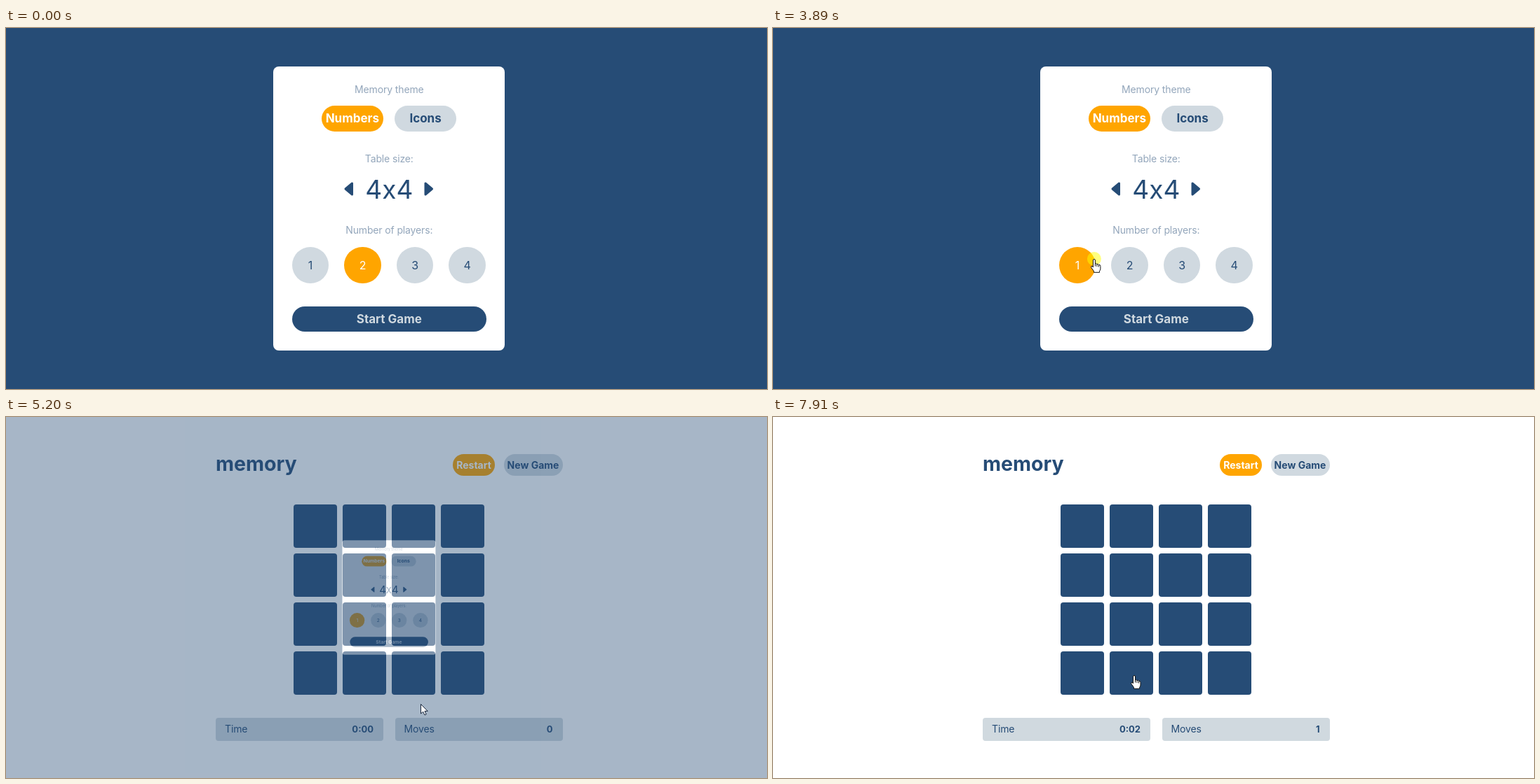
An HTML page for the animation above (8 s loop, 1085 px wide and 516 px high).

```html
<!DOCTYPE html>
<html lang="en">
<head>
<meta charset="utf-8">
<title>Memory game</title>
<style>
  html, body { margin: 0; width: 100%; height: 100%; overflow: hidden; background: #fff; }
  #stage { position: absolute; inset: 0; width: 1085px; height: 516px; overflow: hidden;
    font-family: Inter, "Open Sans", sans-serif; color: #264c76; cursor: default; }
  #stage div { position: absolute; display: flex; align-items: center; justify-content: center;
    white-space: nowrap; line-height: 1; }
  #stage svg { position: absolute; left: 0; top: 0; overflow: visible; }
  #stage .fill { inset: 0; }
  #stage .left { justify-content: flex-start; }
  #stage .right { justify-content: flex-end; }
  .pill, .round { border-radius: 30px; background: #d0d9e0; }
  .pill { font-weight: 700; font-size: 17px; }
  .small { font-size: 14px; }
  .round { font-size: 16px; }
  #stage .on { background: #ffa500; color: #fff; }
  #stage .start { background: #264c76; color: #d0d9e0; }
  .title { font-size: 28.5px; font-weight: 700; }
  .size { font-size: 37px; }
  .label { font-size: 14px; letter-spacing: -.01em; color: #93a6bb; }
  .dialog { border-radius: 8px; background: #fff; }
  .panel { border-radius: 4px; background: #d0d9df; }
  .stat { font-size: 14px; letter-spacing: -.01em; }
  .value { font-size: 13px; font-weight: 700; }
  .card { border-radius: 4px; color: #fff; font-weight: 700; font-size: 26px; }
  .halo { border-radius: 50%; background: rgba(255, 255, 0, .5); }
  #stage .pointer, .pointer * { pointer-events: none; }
</style>
</head>
<body>
<div id="stage"></div>
<script>
const LOOP = 8000;
const stage = document.getElementById('stage');

// Moments of the pointer's clicks; every state change follows from them.
const click = { bigger: 1580, smaller: 1920, onePlayer: 3760, start: 5000, first: 6060, second: 6680 };

// Stops of the pointer: time, x, y.
const stops = [
  [350, 1033, 474], [1140, 610, 256], [1360, 599, 227], [2150, 599, 227], [2800, 533.5, 344],
  [3310, 514, 347], [3610, 450, 338], [3830, 450, 338], [4200, 545, 228], [4560, 638, 212],
  [4900, 591, 410], [5200, 591, 410], [5340, 501, 414], [5910, 443, 371], [6340, 443, 371],
  [6600, 442, 295], [7150, 442, 295], [7700, 514, 369]
];

const ramp = (t, from, length) => Math.min(1, Math.max(0, (t - from) / length));
const smooth = p => p * p * (3 - 2 * p);
const ease = (t, from, length) => smooth(ramp(t, from, length));
const between = (t, from, to) => t >= from && t < to;

function box(parent, cls, x, y, w, h, text = '') {
  const el = document.createElement('div');
  el.className = cls;
  el.textContent = text;
  Object.assign(el.style, { left: x + 'px', top: y + 'px', width: w + 'px', height: h + 'px' });
  parent.append(el);
  return el;
}

function group(cls) {
  const el = document.createElement('div');
  el.className = cls;
  stage.append(el);
  return el;
}

function shape(parent, d, attrs) {
  parent.insertAdjacentHTML('beforeend',
    `<svg width="1" height="1"><path d="${d}" stroke-linejoin="round" ${attrs}/></svg>`);
  return parent.lastElementChild;
}

// Game board
const game = group('fill');
box(game, 'title left', 299, 52, 140, 31, 'memory');
box(game, 'pill small on hot', 637, 53, 60, 31, 'Restart');
box(game, 'pill small hot', 709.5, 53, 84, 31, 'New Game');
const cards = Array.from({ length: 16 }, (_, i) => {
  const slot = box(game, 'hot', 410.2 + i % 4 * 70, 125.2 + Math.floor(i / 4) * 70, 61.8, 61.8);
  return box(slot, 'card', 0, 0, 61.8, 61.8);
});

function stat(x, name) {
  box(game, 'panel', x, 430, 239, 33);
  box(game, 'stat left', x + 13, 430, 100, 32, name);
  return box(game, 'value right', x + 125, 430, 100, 32);
}
const time = stat(299, 'Time');
const moves = stat(554.5, 'Moves');

// Settings dialog
const menu = group('fill');
menu.style.background = '#264c76';
const dialog = box(menu, 'dialog', 381.3, 55.2, 329.8, 405.8);
box(dialog, 'label', 0, 23, 330, 20, 'Memory theme');
box(dialog, 'pill on hot', 68.5, 56, 88, 37, 'Numbers');
box(dialog, 'pill hot', 173, 56, 87.5, 37, 'Icons');
box(dialog, 'label', 0, 122, 330, 20, 'Table size:');
const size = box(dialog, 'size', 100, 150, 130, 50);
const triangle = 'class="hot" fill="#264c76" stroke="#264c76" stroke-width="3"';
const leftArrow = shape(dialog, 'M103 175L112.5 167V183Z', triangle);
const rightArrow = shape(dialog, 'M226.5 175L217 167V183Z', triangle);
box(dialog, 'label', 0, 224, 330, 20, 'Number of players:');
const players = [1, 2, 3, 4].map((n, i) =>
  box(dialog, 'round hot', 26.4 + i * 74.5, 257.5, 52.8, 52.8, n));
const start = box(dialog, 'pill start hot', 26.5, 343, 277, 36.3, 'Start Game');

// Pointer
const pointer = group('pointer');
const halo = box(pointer, 'halo', -9, -10, 20, 20);
const arrow = shape(pointer, 'M.5 .5V14L3.7 11.2L6 16L8.2 15L6 10.4H10.2Z',
  'fill="#fff" stroke="#16243a"');
const hand = shape(pointer,
  'M-1.5 12V2Q-1.5 .5 0 .5T1.5 2V7Q3 6 4 7.6Q5.6 6.8 6.5 8.4Q9 8 9 10.5V14Q9 16 7.6 17.5V19.3H-.5V17.5L-4.2 12.3Q-4.6 10 -2.8 10.2Z' +
  'M1.5 7V10.5M4 7.6V11M6.5 8.4V11.5',
  'fill="#fff" stroke="#111" transform="translate(1)"');

function tipAt(t) {
  const i = stops.findIndex(s => s[0] > t);
  if (i < 1) return stops.at(i).slice(1);
  const [t0, x0, y0] = stops[i - 1], [t1, x1, y1] = stops[i];
  const p = ease(t, t0, t1 - t0);
  return [x0 + (x1 - x0) * p, y0 + (y1 - y0) * p];
}

function turn(card, number, amount) {
  const open = amount > .5;
  const angle = amount * 180 - (open ? 180 : 0);
  card.textContent = open ? number : '';
  card.style.background = open ? '#d0d9df' : '#264c76';
  card.style.transform = angle ? `perspective(400px) rotateY(${angle}deg)` : 'none';
}

const show = (el, visible) => { el.style.visibility = visible ? 'visible' : 'hidden'; };

function render(t) {
  const large = between(t, click.bigger + 70, click.smaller + 70);
  size.textContent = large ? '6x6' : '4x4';
  leftArrow.style.left = large ? '2px' : '0';
  rightArrow.style.left = large ? '-2px' : '0';
  const chosen = t < click.onePlayer + 70 ? 1 : 0;
  players.forEach((el, i) => el.classList.toggle('on', i === chosen));

  const presence = 1 - ramp(t, click.start + 78, 206);
  menu.style.opacity = presence;
  dialog.style.transform = `scale(${presence})`;
  show(menu, presence > 0);

  const close = ease(t, click.second + 700, 320);
  cards.forEach(card => turn(card, '', 0));
  turn(cards[12], 8, ease(t, click.first + 30, 300) - close);
  turn(cards[8], 3, ease(t, click.second + 30, 300) - close);
  const seconds = Math.max(0, Math.floor((t - click.start - 130) / 1000));
  time.textContent = '0:0' + seconds;
  moves.textContent = t < click.second + 320 ? 0 : 1;

  const [x, y] = tipAt(t);
  const hovered = document.elementFromPoint(x, y)?.closest('.hot');
  const visible = t >= stops[0][0];
  start.style.opacity = hovered === start ? .75 : 1;
  pointer.style.transform = `translate(${x}px, ${y}px)`;
  show(arrow, visible && !hovered);
  show(hand, visible && hovered);
  show(halo, Object.values(click).some(c => between(t, c, c + 140)));
}

const began = performance.now();
function tick() {
  render((performance.now() - began) % LOOP);
  requestAnimationFrame(tick);
}
tick();
</script>
</body>
</html>
```
